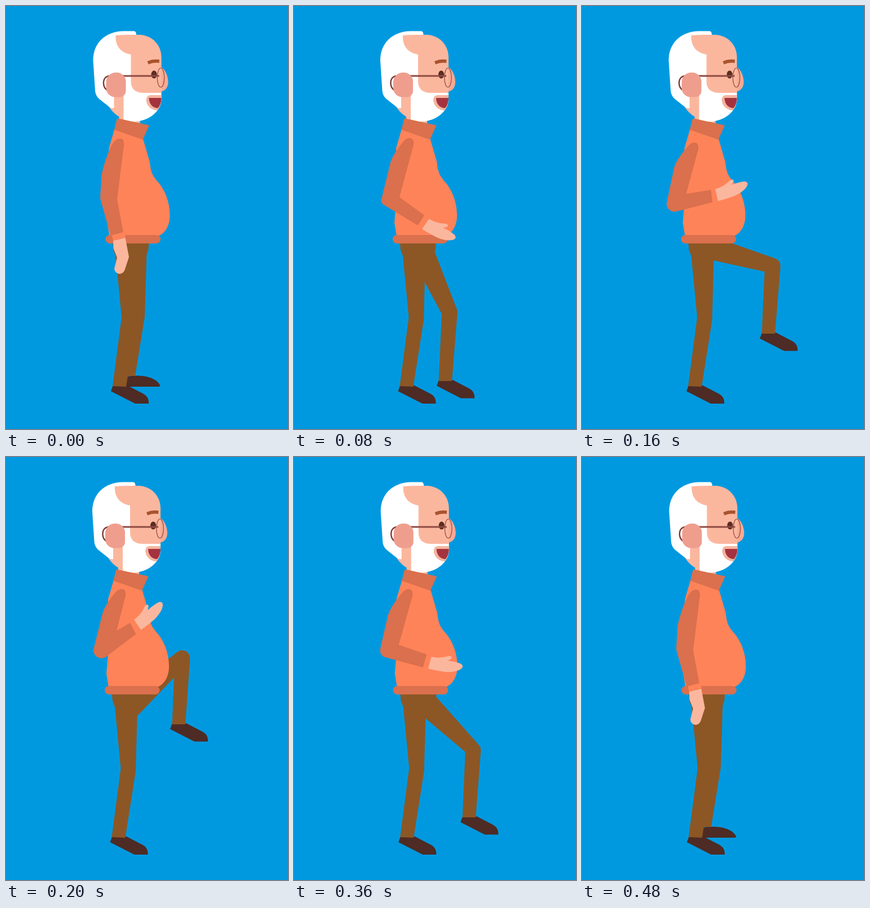
Recreate the animation shown at these times as an HTML page with a canvas. Size 500 by 750 pixels, loop 520 ms.

```html
<!DOCTYPE html>
<html lang="en">
<head>
<meta charset="utf-8">
<title>Marching man</title>
<style>
html, body { margin: 0; width: 100%; height: 100%; overflow: hidden; background: #0099e0; }
canvas { display: block; }
</style>
</head>
<body>
<canvas id="stage" width="500" height="750"></canvas>
<script>
const ctx = document.getElementById('stage').getContext('2d');

const SKY = '#0099e0', SWEATER = '#ff8359', SLEEVE = '#da704d', TROUSER = '#8c5725',
      SHOE = '#4e2b24', SKIN = '#fbb79e', BLUSH = '#ef9e8e', FRAME = '#8f4a45';

// Each pose: body shift, arm (shoulder, inner elbow, cuff, outer elbow, upper back), hand, far leg.
const POSES = {
  stand: {
    dx: 1.5,
    arm: { shoulder: [207.5, 247], inner: [195.5, 343], cuffIn: [206.5, 401], cuffOut: [184, 407],
           elbow: [165.5, 341], back: [168, 300], r: 10 },
    hand: { at: [199.5, 413], angle: 77, relaxed: true },
    leg: { hip: [248, 438], under: [215, 480], knee: [244.5, 551], inner: [220, 552], ankle: [204, 656], r: 14 }
  },
  shift: {
    dx: 0.7,
    arm: { shoulder: [210, 246], inner: [191, 342], cuffIn: [222, 390], cuffOut: [203.5, 402],
           elbow: [159, 346], back: [169, 290], r: 10 },
    hand: { at: [219, 406], angle: 57 },
    leg: { hip: [249, 437], under: [232, 510], knee: [267, 547], inner: [242, 549], ankle: [231, 664], r: 14 }
  },
  step: {
    dx: 0,
    arm: { shoulder: [212, 246], inner: [187, 339], cuffIn: [231, 371], cuffOut: [219.5, 389],
           elbow: [153.5, 349], back: [170, 282], r: 9 },
    hand: { at: [234, 387], angle: 33.7 },
    leg: { hip: [250, 437], under: [232, 490], knee: [290, 541], inner: [262, 546], ankle: [256.5, 665], r: 14 }
  },
  lift: {
    dx: 0.7,
    arm: { shoulder: [209.5, 246], inner: [185, 333], cuffIn: [234.5, 350], cuffOut: [228, 373],
           elbow: [149.5, 352], back: [165, 285], r: 13 },
    hand: { at: [241, 365], angle: 15 },
    leg: { hip: [252, 426], under: [232, 463], knee: [331, 515], inner: [303, 523], ankle: [298, 639], r: 14 }
  },
  raise: {
    dx: 0.7,
    arm: { shoulder: [205.5, 254], inner: [184, 333], cuffIn: [228, 326], cuffOut: [230.5, 348],
           elbow: [145, 370], back: [162, 290], r: 14 },
    hand: { at: [239, 335], angle: -13 },
    leg: { hip: [266, 421], under: [232, 451], knee: [352, 451], inner: [323, 471], ankle: [318, 581], r: 14 }
  },
  top: {
    dx: 0,
    arm: { shoulder: [212, 246], inner: [196, 308], cuffIn: [220, 294], cuffOut: [230.5, 314],
           elbow: [146, 378], back: [170, 282], r: 14 },
    hand: { at: [234, 297], angle: -33.7 },
    leg: { hip: [230, 404], under: [234, 458], knee: [328.5, 326], inner: [298, 391], ankle: [294.5, 474], r: 14 }
  }
};

const STEP = 40;
const SEQUENCE = ['stand', 'shift', 'step', 'lift', 'raise', 'top', 'top', 'top',
                  'raise', 'lift', 'step', 'shift', 'stand'];

function fill(color, d) {
  ctx.fillStyle = color;
  ctx.fill(new Path2D(d));
}

function stroke(color, width, d) {
  ctx.strokeStyle = color;
  ctx.lineWidth = width;
  ctx.stroke(new Path2D(d));
}

function shoe([x, y]) {
  ctx.save();
  ctx.translate(x, y);
  fill(SHOE, 'M0-1L-3.5 8.5L39.5 30.5H63.5V27C63 19 58 15 51 11.5L25-2Z');
  ctx.restore();
}

function farLeg({ hip, under, knee, inner, ankle, r }, flatFoot) {
  const [x, y] = ankle;
  if (flatFoot) fill(SHOE, 'M210.5 675L212.5 660Q213 657 216 656.5C240 653 264 658 271.5 672Q272 675 269 675Z');
  else shoe(ankle);
  ctx.fillStyle = TROUSER;
  ctx.beginPath();
  ctx.moveTo(...hip);
  ctx.arcTo(...knee, x + 23.5, y, r);
  ctx.lineTo(x + 23.5, y);
  ctx.lineTo(x, y);
  ctx.lineTo(...inner);
  ctx.lineTo(...under);
  ctx.lineTo(200, 440);
  ctx.lineTo(200, 421);
  ctx.fill();
}

function nearLeg() {
  shoe([188, 674.5]);
  fill(TROUSER, 'M187.5 418L189 433L193 443L203.5 552L187.5 674L211.5 675L230 557L233 445L248 440L251 432L252 418Z');
}

function torso() {
  fill(SWEATER, 'M191 218L241 234L253.5 277C255 295 259 302 268 312C280 326 289 347 289 371' +
    'C289 390 280 404 268 408H182L178 384L181 350L181 252Z');
  ctx.fillStyle = SLEEVE;
  ctx.beginPath();
  ctx.roundRect(175, 406, 97.5, 15, 7.5);
  ctx.fill();
}

function collar() {
  fill(SLEEVE, 'M195 201Q196 199 198 199.5L252.5 211.5L241 237L190.5 219.5Z');
}

function head() {
  fill(SKIN, 'M199 185H236V208L199 201Z');
  fill(SKIN, 'M182 155H215V202Q194 198 182 180Z');
  fill('#fff', 'M207 44.5H226Q229.5 45 229.5 52L225 110V158H190V181Q187 182 183 180' +
    'L164 165Q157 159 156.5 150L153 97C153 65 175 45 207 44.5Z');
  fill('#fff', 'M207 130H274V165C274 186 252 205 224 205Q214 205 207 202Z');
  fill('#f5aa94', 'M272 108C280 110 286 124 286 135C286 144 281 151 272 152Z');
  fill(SKIN, 'M193 52Q205 50.5 235 51C258 52 274 69 274 91V154H243C228 154 220 147 220 134V86C203 83 192 72 193 52Z');

  fill('#f4b49e', 'M274 158H254Q247 159 247 167C248 178 257 185 267 185L272 177L274 165Z');
  fill('#a5323f', 'M252 163H274Q274 174 268 181C259 181 252 174 252 163Z');

  fill('#a9542f', 'M249 98Q258 93.5 270.5 95L270 101Q260 99.5 251 103.5Z');
  ctx.fillStyle = '#5a2d22';
  ctx.beginPath();
  ctx.ellipse(261, 121.5, 5, 7, 0, 0, 7);
  ctx.fill();

  stroke(FRAME, 3, 'M205 124H270');
  stroke('#7d3b38', 2.5, 'M183 124C174 124 171 131 171.5 138Q172 146 179 150');
  ctx.fillStyle = BLUSH;
  ctx.beginPath();
  ctx.roundRect(176, 118, 35, 43.5, [17, 16, 11, 16]);
  ctx.fill();
  ctx.strokeStyle = '#98473f';
  ctx.lineWidth = 1.2;
  ctx.beginPath();
  ctx.ellipse(273, 127, 6.3, 17, 0, 0, 7);
  ctx.stroke();
}

function hand({ at, angle, relaxed }) {
  ctx.save();
  ctx.translate(...at);
  ctx.rotate(angle * Math.PI / 180);
  ctx.fillStyle = SWEATER;
  ctx.fillRect(-13, -11.5, 13, 23);
  if (!relaxed) {
    fill(SKIN, 'M-1-10.8L9-12Q18-14 29-20.5Q35-21.5 34-17.5Q31-13 28-11.5Q42-14 53-12.5' +
      'Q58-10 57-7C55 0 43 6 30 8.5Q16 10.5-1 10.8Z');
  }
  ctx.restore();
  if (relaxed) fill(SKIN, 'M188.5 416L210 411L216.5 445L209 468Q206 475 199.5 475Q192 474 190.5 466L195.5 446L189 430Z');
}

function arm({ shoulder, inner, cuffIn, cuffOut, elbow, back, r }) {
  const [x, y] = shoulder;
  ctx.fillStyle = SLEEVE;
  ctx.beginPath();
  ctx.moveTo(x, y);
  for (const p of [inner, cuffIn, cuffOut]) ctx.lineTo(...p);
  ctx.arcTo(...elbow, ...back, r);
  ctx.lineTo(...back);
  ctx.bezierCurveTo(back[0] + 3, back[1] - 16, x - 26, y + 4, x - 17, y - 7);
  ctx.bezierCurveTo(x - 9, y - 15, x + 2, y - 14, x, y);
  ctx.fill();
}

function draw(time) {
  const pose = POSES[SEQUENCE[Math.floor(time / STEP) % SEQUENCE.length]];
  ctx.fillStyle = SKY;
  ctx.fillRect(0, 0, 500, 750);
  ctx.save();
  ctx.translate(pose.dx, 0);
  farLeg(pose.leg, pose === POSES.stand);
  nearLeg();
  torso();
  head();
  collar();
  hand(pose.hand);
  arm(pose.arm);
  ctx.restore();
}

const start = performance.now();
function tick() {
  draw(performance.now() - start);
  requestAnimationFrame(tick);
}
tick();
</script>
</body>
</html>
```
